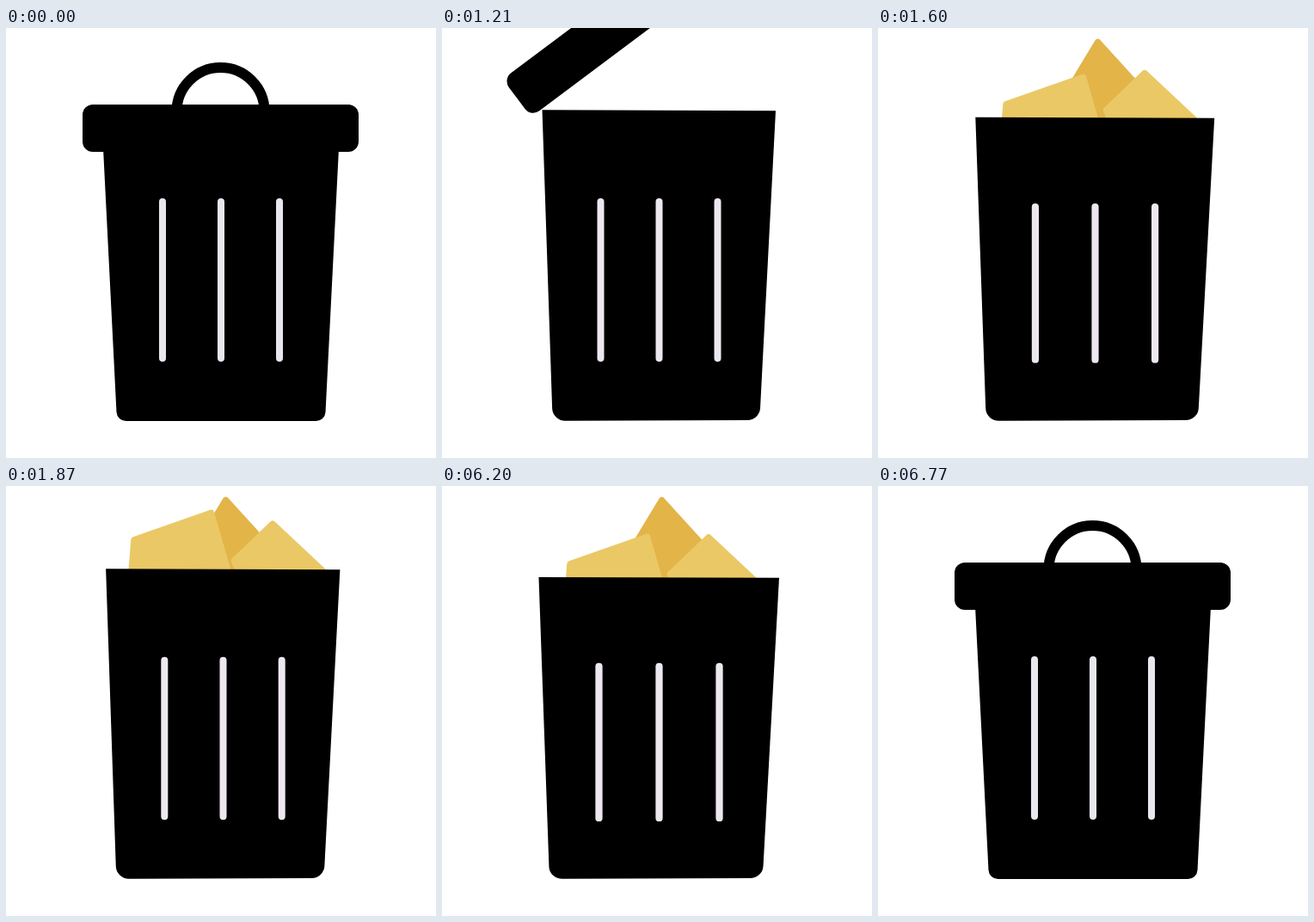
Recreate the animation shown at these times as an HTML page with a canvas. Size 500 px wide and 500 px high, loop 6800 ms.

```html
<!DOCTYPE html>
<html lang="en">
<head>
<meta charset="utf-8">
<title>Bin</title>
<style>
  html, body { margin: 0; width: 100%; height: 100%; overflow: hidden; background: #fff; }
  canvas { display: block; width: 100%; height: 100%; }
</style>
</head>
<body>
<canvas id="stage" width="500" height="500"></canvas>
<script>
const ctx = document.getElementById('stage').getContext('2d');

const LOOP = 6800, STEP = 30;
const OPEN = 1030, OPENED = 1870, CLOSE = 5930;
const MIRROR = 7770; // closing replays the opening backwards
const BASE_X = 252.5, BASE_Y = 456.5;
const DARK = '#e3b448', LIGHT = '#eac865';

const sheet = [[255, 10.5], [335.5, 99], [305, 162], [243, 184], [190, 118]];
const papers = [
  { land: 1330, light: true, color: DARK, points: sheet },
  { land: 1420, color: DARK, points: sheet },
  { land: 1570, color: LIGHT, points: [[241, 26.5], [268, 120], [215, 160], [139, 140], [145.5, 60]] },
  { land: 1487, color: LIGHT, points: [[310, 39], [372, 97], [372, 134], [288, 153], [261, 86]] }
];

// Height of a paper: fall 28 px too deep, then rise back into place
function drop(t, land) {
  const u = t - land;
  if (u < 0) return 28 - 107 * (-u / 90) ** 2.4;
  return 14 * (1 + Math.cos(Math.PI * Math.min(u / 180, 1)));
}

// Each heavy paper presses the bin down; a small ripple follows
function squash(t) {
  const dips = papers.filter(p => !p.light).map(p => {
    const u = Math.min(Math.abs(t - p.land + 10) / 130, 1);
    return 0.03 * Math.cos(u * Math.PI / 2) ** 2;
  });
  const ripple = t > 1720 ? 0.004 * Math.sin((t - 1840) * Math.PI / 120) : 0;
  return 1 - Math.max(...dips) - ripple;
}

// Polygon with one radius, or a radius per corner
function shape(points, radius, color) {
  const n = points.length;
  const [ax, ay] = points[n - 1], [bx, by] = points[0];
  ctx.beginPath();
  ctx.moveTo((ax + bx) / 2, (ay + by) / 2);
  points.forEach(([x, y], i) => {
    const [nx, ny] = points[(i + 1) % n];
    ctx.arcTo(x, y, nx, ny, Array.isArray(radius) ? radius[i] : radius);
  });
  ctx.closePath();
  ctx.fillStyle = color;
  ctx.fill();
}

function stripes(center, color) {
  ctx.strokeStyle = color;
  ctx.lineWidth = 8;
  ctx.lineCap = 'round';
  ctx.beginPath();
  for (const dx of [-68, 0, 68]) {
    ctx.moveTo(center + dx, 202);
    ctx.lineTo(center + dx, 384);
  }
  ctx.stroke();
}

// The lid turns around its lower left corner
function lid(x, y, degrees) {
  ctx.save();
  ctx.translate(x, y);
  ctx.rotate(degrees * Math.PI / 180);
  shape([[0, -55], [321, -55], [321, 0], [0, 0]], 12, '#000');
  ctx.strokeStyle = '#000';
  ctx.lineWidth = 12;
  ctx.lineCap = 'butt';
  ctx.beginPath();
  ctx.arc(160.5, -47, 51, Math.PI, 0);
  ctx.stroke();
  ctx.restore();
}

function flyingLid(t) {
  const u = (t - OPEN) / 300;
  if (u > 1.1) return;
  lid(92 + 90 * u ** 2 - 160 * u ** 4, 144 - 87 * u ** 1.5, -3 - 94 * u ** 2);
}

function closedBin() {
  shape([[111.5, 110], [388.5, 110], [371, 457], [129, 457]], [0, 0, 11, 11], '#000');
  stripes(250, '#e9e6ee');
  lid(89, 144, 0);
}

function openBin(t) {
  for (const { land, color, points } of papers) {
    const dy = drop(t, land);
    shape(points.map(([x, y]) => [x, y + dy]), 3.5, color);
  }

  const s = squash(t);
  ctx.save();
  ctx.translate(BASE_X, BASE_Y);
  ctx.scale(2 - s, s);
  ctx.translate(-BASE_X, -BASE_Y);
  shape([[116.5, 95.3], [388, 96.2], [369.3, 456], [128.6, 456.8]], [0, 0, 15, 15], '#000');
  stripes(BASE_X, '#ede8f0');
  ctx.restore();

  flyingLid(t);
}

const snap = (t, from) => from + Math.floor((t - from) / STEP) * STEP;

function openingTime(t) {
  if (t < OPEN) return 0;
  if (t < CLOSE) return Math.min(snap(t, OPEN), OPENED);
  return MIRROR - snap(t, CLOSE);
}

const start = performance.now();

function draw() {
  const t = openingTime((performance.now() - start) % LOOP);
  ctx.fillStyle = '#fff';
  ctx.fillRect(0, 0, 500, 500);
  if (t < OPEN) closedBin();
  else openBin(t);
  requestAnimationFrame(draw);
}
draw();
</script>
</body>
</html>
```
